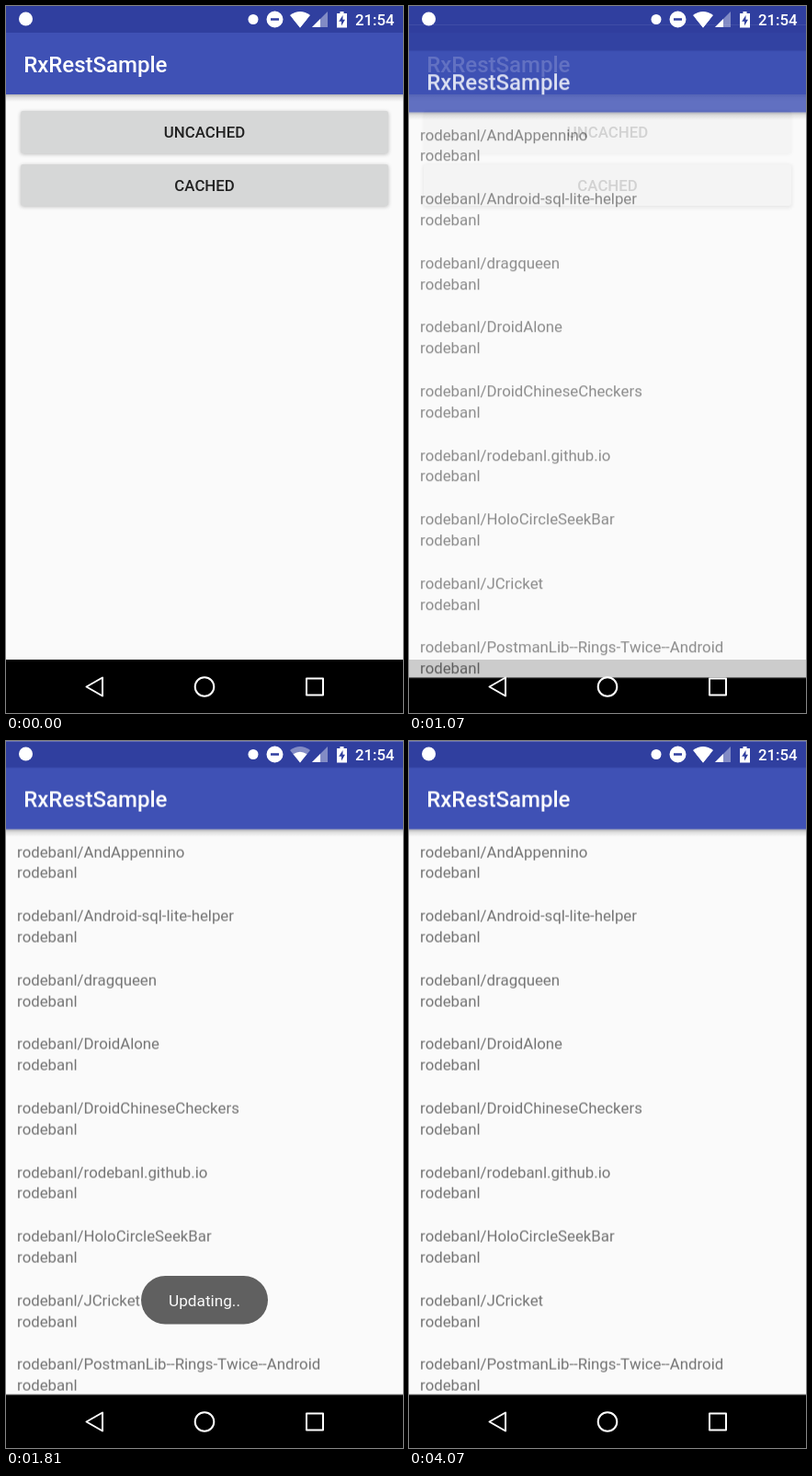
Recreate the animation shown at these times as an HTML page. Size 432x768 px, loop 4.69 s.

```html
<!DOCTYPE html>
<html lang="en">
<head>
<meta charset="utf-8">
<title>RxRestSample</title>
<style>
  html, body { margin: 0; width: 100%; height: 100%; overflow: hidden; background: #000; }
  svg { display: block; width: 432px; height: 768px; }
  text { font: 16.8px Roboto, sans-serif; font-kerning: none; }
  .medium { font-weight: 500; }
  .title { font-size: 24px; font-weight: 500; fill: #fff; }
  .mid { text-anchor: middle; }
  .button { fill: #d6d7d7; }
  .label { fill: #212121; font-weight: 500; text-anchor: middle; }
  .list { fill: #737373; }
  .shadow { filter: blur(2px); }

  .lift, .touch, .sheet, .toast { opacity: 0; }
  .lift, .touch, .sheet, .toast, .wifi { animation: 4690ms linear infinite; }
  .lift { animation-name: lift; }
  .touch { animation-name: touch; }
  .sheet { animation-name: appear, slide; }
  .toast { animation-name: toast; }
  .wifi { animation-name: weaken; animation-timing-function: step-end; }

  @keyframes lift {
    0%, 14.3% { opacity: 0; }
    16.6%, 100% { opacity: 1; }
  }
  @keyframes touch {
    0%, 14.3% { opacity: 0; }
    15.2%, 20.5% { opacity: 1; }
    22.2%, 100% { opacity: 0; }
  }
  @keyframes appear {
    0% { opacity: 0; }
    21.32% { opacity: 0; animation-timing-function: cubic-bezier(.165, .84, .44, 1); }
    25.59%, 100% { opacity: 1; }
  }
  @keyframes slide {
    0% { transform: translateY(61.4px); }
    21.35% { transform: translateY(61.4px); animation-timing-function: cubic-bezier(.23, 1, .32, 1); }
    28.81%, 100% { transform: none; }
  }
  @keyframes toast {
    0% { opacity: 0; }
    25.16% { opacity: 0; animation-timing-function: cubic-bezier(.333, .667, .667, 1); }
    33.69% { opacity: 1; }
    61.41% { opacity: 1; animation-timing-function: cubic-bezier(.333, 0, .667, .333); }
    72.28%, 100% { opacity: 0; }
  }
  @keyframes weaken {
    0% { opacity: 1; }
    38.59% { opacity: .4; }
    86.78%, 100% { opacity: 1; }
  }
</style>
</head>
<body>
<svg viewBox="0 0 432 768">
  <defs>
    <linearGradient id="fade" x2="0" y2="1">
      <stop offset="0" stop-opacity=".28"/>
      <stop offset=".4" stop-opacity=".11"/>
      <stop offset="1" stop-opacity="0"/>
    </linearGradient>
    <g id="chrome">
      <rect width="432" height="30" fill="#303f9f"/>
      <rect y="29" width="432" height="67" fill="#3f51b5"/>
      <rect y="96" width="432" height="8" fill="url(#fade)"/>
      <rect y="710" width="432" height="58"/>
      <text class="title" x="19.2" y="72">RxRestSample</text>
    </g>
  </defs>

  <g>
    <rect width="432" height="768" fill="#fafafa"/>
    <use href="#chrome"/>
    <rect class="shadow" x="16" y="115" width="400" height="46" rx="2" opacity=".25"/>
    <rect class="shadow" x="16" y="173" width="400" height="45" rx="2" opacity=".25"/>
    <g class="lift"><rect class="shadow" x="15" y="172" width="402" height="48" rx="3" opacity=".25"/></g>
    <rect class="button" x="16" y="114" width="400" height="46" rx="2.4"/>
    <rect class="button" x="16" y="172" width="400" height="45" rx="2.4"/>
    <text class="label" x="216" y="143">UNCACHED</text>
    <text class="label" x="216" y="201">CACHED</text>
  </g>

  <g class="sheet">
    <rect width="432" height="768" fill="#fafafa"/>
    <use href="#chrome"/>
    <g class="list" id="list"></g>
  </g>

  <circle class="touch" cx="318.5" cy="193.5" r="12.5" fill="#c2c3c3"/>

  <g class="toast">
    <rect x="147" y="581" width="138" height="52.5" rx="26.2" fill="#606060"/>
    <text class="mid" x="216" y="614" fill="#fafafa" style="font-size:17.2px">Updating..</text>
  </g>

  <g fill="#fff">
    <circle cx="21.5" cy="14" r="7.5"/>
    <circle cx="269" cy="14.5" r="5.5"/>
    <path fill-rule="evenodd" d="M283.5 14.5a9 9 0 1 0 18 0a9 9 0 1 0-18 0M288 13.2h9v2.6h-9z"/>
    <path class="wifi" d="M309 10Q320 2 331 10L320 23.5z"/>
    <path d="M312.500 14.300Q320 9 327.500 14.300L320 23.500z"/>
    <path d="M350 6V23H333z" opacity=".4"/>
    <path d="M342 14V23H333z"/>
    <path fill-rule="evenodd" d="M360 8h3.5V6h4v2H371v15.5H360zM366.5 10L362.2 16.7H365V21.5L369 14.7H366.5z"/>
    <text class="medium" x="422.5" y="21" text-anchor="end">21:54</text>
  </g>

  <g fill="none" stroke="#fff" stroke-width="2" stroke-linejoin="round">
    <path d="M105 729.5V749.5L87.5 739.5z"/>
    <circle cx="216" cy="739.5" r="10.3"/>
    <rect x="327" y="730.5" width="18" height="18"/>
  </g>
</svg>
<script>
  const owner = 'rodebanl';
  const repos = ['AndAppennino', 'Android-sql-lite-helper', 'dragqueen', 'DroidAlone',
    'DroidChineseCheckers', owner + '.github.io', 'HoloCircleSeekBar', 'JCricket',
    'PostmanLib--Rings-Twice--Android'];
  const list = document.getElementById('list');

  function addLine(y, content) {
    const line = document.createElementNS('http://www.w3.org/2000/svg', 'text');
    line.setAttribute('x', 12);
    line.setAttribute('y', y);
    line.textContent = content;
    list.append(line);
  }

  repos.forEach((repo, i) => {
    const y = 126.2 + i * 69.6;
    addLine(y, owner + '/' + repo);
    addLine(y + 22.8, owner);
  });
</script>
</body>
</html>
```
